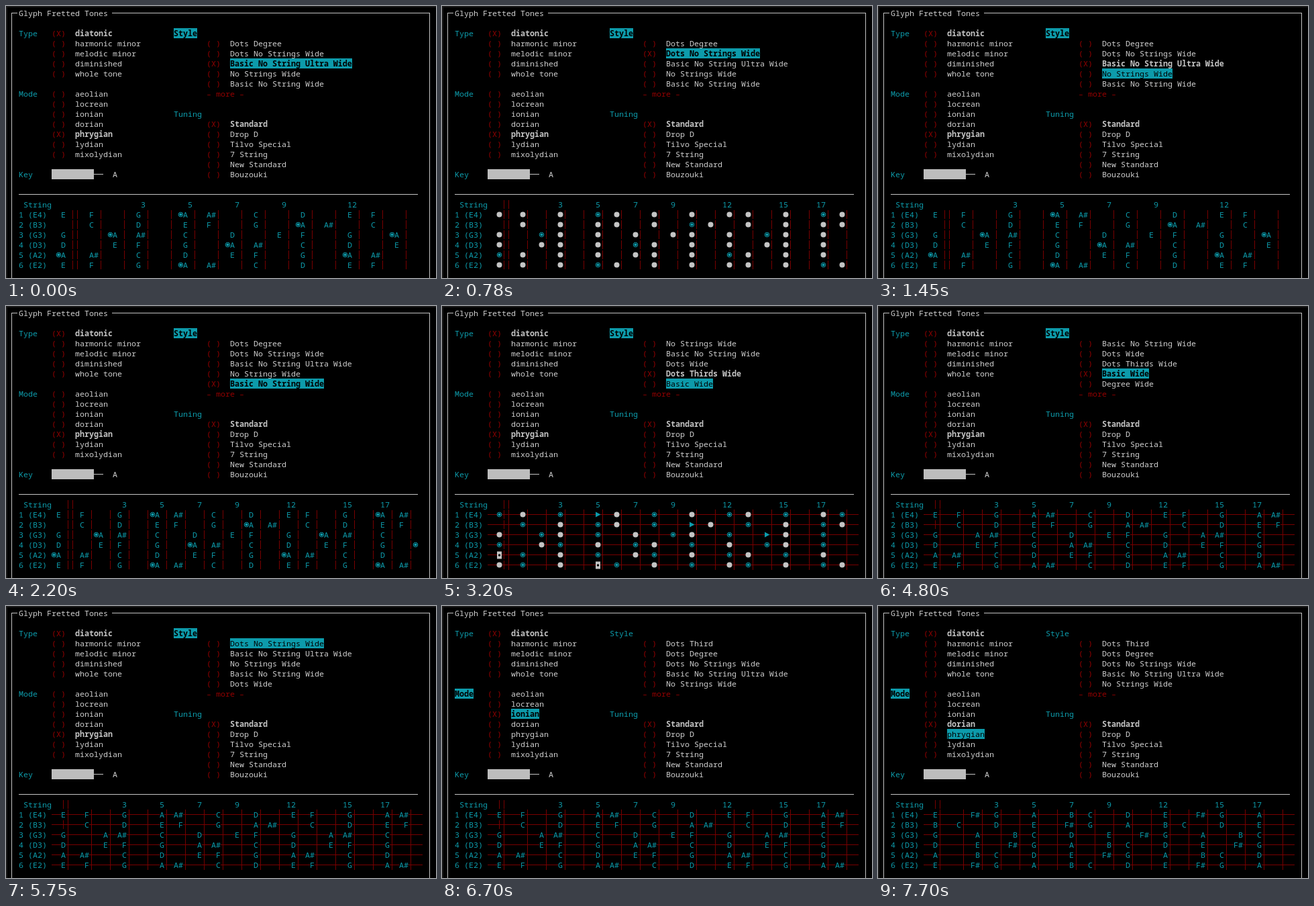
An HTML page that plays this animation: 641x405 px, repeating every 8 s.

```html
<!DOCTYPE html>
<html lang="en">
<head>
<meta charset="utf-8">
<title>Fretboard terminal</title>
<style>
  html, body { margin: 0; width: 100%; height: 100%; overflow: hidden; background: #000; }
  svg { display: block; }
  text { font: 11.667px "Noto Sans Mono", "DejaVu Sans Mono", monospace; white-space: pre; }
  .bold { font-weight: 700; }
</style>
</head>
<body>
<svg id="stage" width="641" height="405" viewBox="0 0 641 405"></svg>
<script>
(() => {
const LOOP = 8000;
const CELL = 7, LINE = 15;
const TEAL = '#0d9bab', RED = '#930000', WIRE = '#780000', GREY = '#cfcfcf', PALE = '#c4c4c4';

const TYPES = ['diatonic', 'harmonic minor', 'melodic minor', 'diminished', 'whole tone'];
const MODES = ['aeolian', 'locrean', 'ionian', 'dorian', 'phrygian', 'lydian', 'mixolydian'];
const TUNINGS = ['Standard', 'Drop D', 'Tilvo Special', '7 String', 'New Standard', 'Bouzouki'];
const STYLES = [
  { name: 'Dots Third' },
  { name: 'Dots Degree' },
  { name: 'Dots No Strings Wide', kind: 'dots', step: 4 },
  { name: 'Basic No String Ultra Wide', kind: 'marked', step: 5 },
  { name: 'No Strings Wide', kind: 'notes', step: 4 },
  { name: 'Basic No String Wide', kind: 'marked', step: 4 },
  { name: 'Dots Wide', kind: 'dots', step: 4, wired: true },
  { name: 'Dots Thirds Wide', kind: 'thirds', step: 4, wired: true },
  { name: 'Basic Wide', kind: 'notes', step: 4, wired: true },
  { name: 'Degree Wide', kind: 'degrees', step: 4, wired: true }
];
const SCALES = {
  2: [0, 2, 4, 5, 7, 9, 11],
  3: [0, 2, 3, 5, 7, 9, 10],
  4: [0, 1, 3, 5, 7, 8, 10]
};
const PITCHES = ['C', 'C#', 'D', 'D#', 'E', 'F', 'F#', 'G', 'G#', 'A', 'A#', 'B'];
const OPEN = [64, 59, 55, 50, 45, 40];
const ROOT = 45;
const LAST_COL = 86;

// Each entry changes part of the state at its time.
const EVENTS = [
  [0, { focus: 'Style', first: 1, cursor: 3, style: 3, board: 3, mode: 4, scale: 4, modeCursor: 4 }],
  [100, { cursor: 2 }], [730, { style: 2 }], [780, { board: 2 }],
  [1080, { cursor: 3 }], [1250, { style: 3 }], [1300, { board: 3 }],
  [1450, { cursor: 4 }], [1700, { style: 4, board: 4 }],
  [1900, { cursor: 5 }], [2050, { style: 5 }], [2100, { board: 5 }],
  [2350, { cursor: 6, first: 2 }], [2500, { style: 6 }], [2550, { board: 6 }],
  [2800, { cursor: 7, first: 3 }], [2950, { style: 7, board: 7 }],
  [3150, { cursor: 8, first: 4 }], [3450, { style: 8, board: 8 }],
  [3900, { cursor: 9, first: 5 }], [4100, { style: 9 }], [4150, { board: 9 }],
  [4550, { cursor: 8 }], [4700, { style: 8 }], [4750, { board: 8 }],
  [5300, { cursor: 7 }],
  ...[6, 5, 4, 3, 2, 1, 0].map((cursor, i) => [5550 + 50 * i, { cursor, first: Math.min(5, cursor) }]),
  [5900, { focus: 'Key' }], [5950, { focus: 'Mode' }],
  [6000, { modeCursor: 3 }], [6050, { modeCursor: 2 }],
  [6700, { mode: 2 }], [6750, { scale: 2 }],
  [7050, { modeCursor: 3 }], [7350, { mode: 3 }], [7400, { scale: 3 }],
  [7700, { modeCursor: 4 }]
];

const colX = col => 5 + CELL * col;
const rowY = row => 3 + LINE * row;

const rect = (x, y, w, h, fill) =>
  `<rect x="${x}" y="${y}" width="${w}" height="${h}" fill="${fill}"/>`;
const circle = (x, y, r, fill, stroke = 'none') =>
  `<circle cx="${x}" cy="${y}" r="${r}" fill="${fill}" stroke="${stroke}"/>`;
const text = (col, row, str, fill = GREY, bold = false) =>
  `<text x="${colX(col)}" y="${rowY(row) + 12}" fill="${fill}"${bold ? ' class="bold"' : ''}>${str}</text>`;
const lit = (col, row, str, bold) =>
  rect(colX(col), rowY(row), CELL * str.length, LINE, TEAL) + text(col, row, str, '#000', bold);
const heading = (col, row, str, focus) =>
  str === focus ? lit(col, row, str, true) : text(col, row, str, TEAL);

function radios(col, row, names, chosen, cursor = -1) {
  return names.map((name, i) => {
    const on = i === chosen, y = row + i, x = col + 5;
    return text(col, y, on ? '(X)' : '( )', RED) +
      (i === cursor ? lit(x, y, name, on) : text(x, y, name, on ? PALE : GREY, on));
  }).join('');
}

const GLYPHS = {
  ring: (x, y) => circle(x, y, 3.3, '#000', TEAL) + circle(x, y, 2.1, TEAL),
  dot: (x, y) => circle(x, y, 4, PALE),
  arrow: (x, y) => `<path d="M${x - 3.5} ${y - 4}l7.5 4-7.5 4z" fill="${TEAL}"/>`,
  box: (x, y) => rect(x - 3.5, y - 5, 7, 11, PALE) + circle(x, y + .5, 1.7, '#000')
};
const glyph = (name, col, row) => GLYPHS[name](colX(col) + 3.5, rowY(row) + 7.5);

function thirdsGlyph(pitch, degree) {
  const octave = Math.floor((pitch - ROOT) / 12);
  if (degree === 0 && octave === 0) return 'box';
  if (degree === 0 && octave === 2) return 'arrow';
  const flipped = octave === 1 || octave === 2;
  return (degree % 2 === 0) !== flipped ? 'dot' : 'ring';
}

function noteAt(kind, pitch, degree, end, row) {
  const name = PITCHES[pitch % 12];
  if (kind === 'marked') {
    return (degree === 0 ? glyph('ring', end - 2, row) : '') +
      (end - 1 <= LAST_COL ? text(end - 1, row, name, TEAL) : '');
  }
  if (end > LAST_COL) return '';
  const str = kind === 'notes' ? name : String(degree + 1);
  const start = end - str.length + 1;
  const gap = rect(colX(start), rowY(row), CELL * str.length, LINE, '#000');
  if (kind === 'thirds') return gap + glyph(thirdsGlyph(pitch, degree), end, row);
  if (kind === 'dots') return gap + glyph(degree === 0 ? 'ring' : 'dot', end, row);
  return gap + text(start, row, str, TEAL);
}

function fretboard({ kind, step, wired }, scale) {
  const origin = step + 9;
  const nut = wired && (kind === 'notes' || kind === 'degrees') ? origin - 1 : origin;
  const endOf = fret => fret ? origin + step * fret - 1 : origin - 2;
  const frets = [];
  for (let f = 0; endOf(f) - 2 <= LAST_COL; f++) frets.push(f);

  const shortBar = (col, row) => rect(colX(col) + 3, rowY(row) + 1, 1, 13, WIRE);
  const longBar = (col, row) => rect(colX(col) + 3, rowY(row), 1, LINE, WIRE);
  const bar = wired ? longBar : shortBar;

  let out = text(3, 19, 'String', TEAL);
  for (const f of [3, 5, 7, 9, 12, 15, 17]) {
    const label = String(f);
    if (endOf(f) <= LAST_COL) out += text(endOf(f) - label.length + 1, 19, label, TEAL);
  }
  if (step === 4) out += shortBar(nut - 1, 19) + shortBar(nut, 19);

  OPEN.forEach((open, s) => {
    const row = 20 + s;
    const label = PITCHES[open % 12] + (Math.floor(open / 12) - 1);
    out += text(2, row, `${s + 1} (${label})`, TEAL);
    if (wired) out += rect(colX(9), rowY(row) + 7, CELL * 79, 1, WIRE);
    out += shortBar(nut - 1, row) + bar(nut, row);
    for (const f of frets) {
      const col = origin + step * f;
      if (f > 0 && col <= LAST_COL) out += bar(col, row);
    }
    for (const f of frets) {
      const pitch = open + f;
      const degree = scale.indexOf((pitch - ROOT + 24) % 12);
      if (degree >= 0) out += noteAt(kind, pitch, degree, endOf(f), row);
    }
  });
  return out;
}

const fixed =
  rect(0, 0, 641, 2, '#1a1a1a') + rect(0, 0, 2, 405, '#1a1a1a') +
  rect(8, 10, 9, 1, PALE) + rect(158, 10, 474, 1, PALE) +
  rect(8, 10, 1, 395, PALE) + rect(631, 10, 1, 395, PALE) +
  text(2, 0, 'Glyph Fretted Tones') +
  heading(2, 2, 'Type') + radios(9, 2, TYPES, 0) +
  heading(35, 10, 'Tuning') + radios(42, 11, TUNINGS, 0) +
  text(42, 8, '– more –', RED) +
  rect(68, 243, 63, 15, '#bdbdbd') + rect(131, 250, 14, 1, PALE) + text(22, 16, 'A') +
  rect(19, 280, 595, 1, PALE);

function draw(s) {
  const shown = STYLES.slice(s.first, s.first + 5).map(style => style.name);
  return fixed +
    heading(2, 8, 'Mode', s.focus) +
    radios(9, 8, MODES, s.mode, s.focus === 'Mode' ? s.modeCursor : -1) +
    heading(2, 16, 'Key', s.focus) +
    heading(35, 2, 'Style', s.focus) +
    radios(42, 3, shown, s.style - s.first, s.focus === 'Style' ? s.cursor - s.first : -1) +
    fretboard(STYLES[s.board], SCALES[s.scale]);
}

const stage = document.getElementById('stage');
const begin = performance.now();
let drawn = 0;

function tick() {
  const t = (performance.now() - begin) % LOOP;
  const past = EVENTS.filter(([at]) => at <= t);
  if (past.length !== drawn) {
    drawn = past.length;
    stage.innerHTML = draw(Object.assign({}, ...past.map(([, patch]) => patch)));
  }
  requestAnimationFrame(tick);
}
tick();
})();
</script>
</body>
</html>
```
